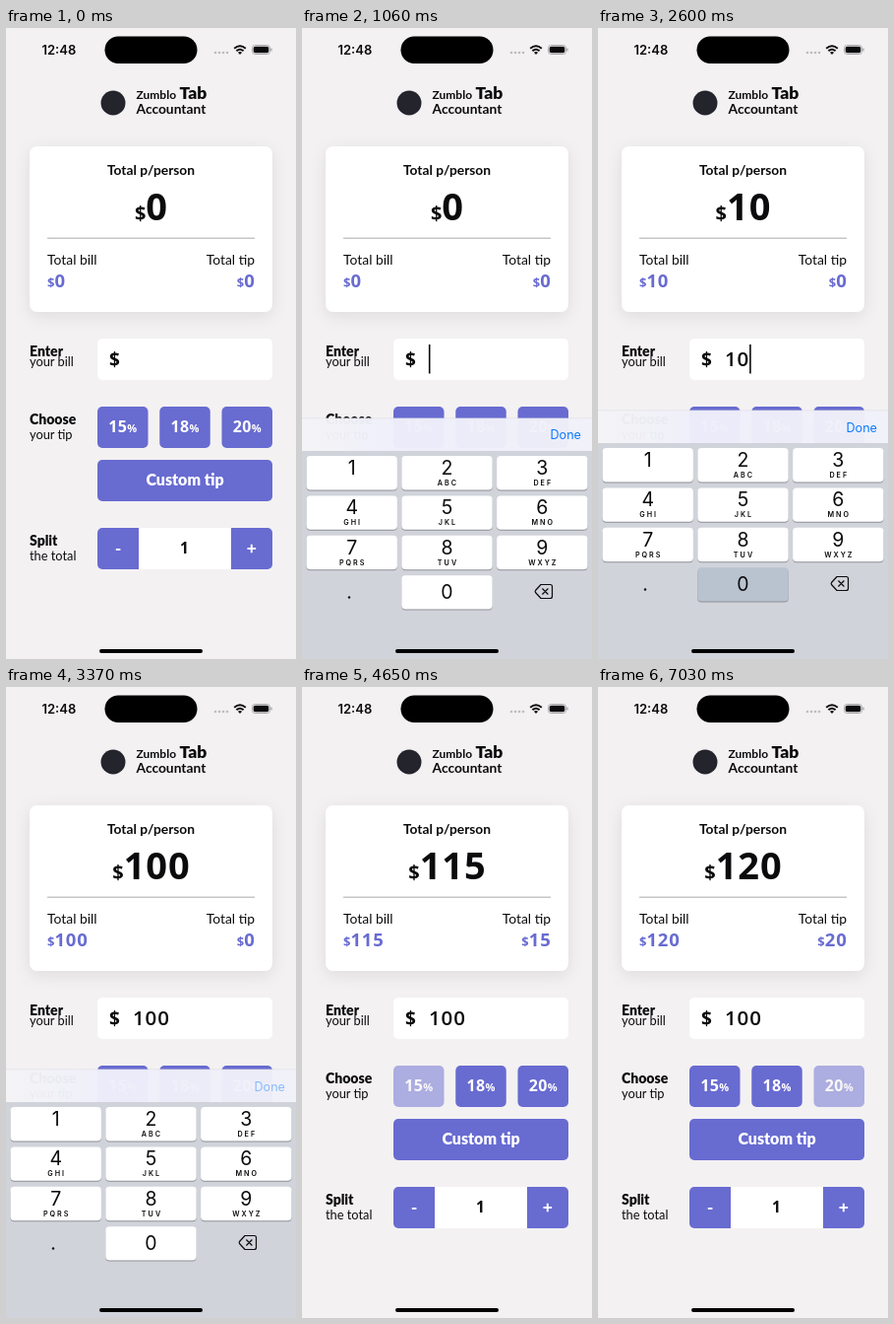
These frames come from a looping animation (295x640 px, 8000 ms). An HTML page:

```html
<!DOCTYPE html>
<html lang="en">
<head>
<meta charset="utf-8">
<title>Tip splitter</title>
<style>
html, body { margin: 0; width: 100%; height: 100%; overflow: hidden; background: #f3f1f2; }
svg { display: block; width: 100vw; height: 100vh; }
text { font-family: Lato, sans-serif; white-space: pre; }
.num { font-family: "Open Sans", sans-serif; font-weight: 700; }
.sys { font-family: Inter, sans-serif; }
</style>
</head>
<body>
<svg id="stage" viewBox="0 0 295 640">
  <defs>
    <filter id="soft" x="-20%" y="-20%" width="140%" height="140%">
      <feDropShadow dx="0" dy="4" stdDeviation="8" flood-color="#000" flood-opacity=".09"/>
    </filter>
    <linearGradient id="glass">
      <stop offset="0" stop-color="#f4f4f6"/>
      <stop offset=".35" stop-color="#efeffb"/>
      <stop offset="1" stop-color="#f1f1f9"/>
    </linearGradient>
  </defs>
  <rect width="295" height="640" fill="#f3f1f2"/>
  <g id="app"></g>
  <g id="keyboard"></g>
  <g id="system"></g>
</svg>
<script>
const LOOP = 8000, PURPLE = '#686bd0', INK = '#0b0b0d';
const byId = id => document.getElementById(id);

function add(parent, tag, attrs, content) {
  const el = document.createElementNS('http://www.w3.org/2000/svg', tag);
  for (const k in attrs) el.setAttribute(k, attrs[k]);
  if (content !== undefined) el.textContent = content;
  parent.appendChild(el);
  return el;
}
const rect = (p, x, y, width, height, rx, fill, more) =>
  add(p, 'rect', { x, y, width, height, rx, fill, ...more });
const path = (p, d, more) => add(p, 'path', { d, fill: 'none', ...more });
const label = (p, x, y, size, weight, str, more) =>
  add(p, 'text', { x, y, 'font-size': size, 'font-weight': weight, fill: INK, ...more }, str);

const middle = { 'text-anchor': 'middle' };
const sys = { class: 'sys' };

// Currency amount: small dollar sign followed by larger digits
function money(p, x, y, small, large, gap, fill, anchor) {
  const t = add(p, 'text', { x, y, class: 'num', fill, 'text-anchor': anchor });
  add(t, 'tspan', { 'font-size': small }, '$');
  return add(t, 'tspan', { 'font-size': large, 'letter-spacing': gap });
}

function buildApp(g) {
  add(g, 'circle', { cx: 109, cy: 76, r: 12.5, fill: '#24242d' });
  label(g, 132.5, 71.5, 12, 700, 'Zumblo');
  label(g, 176.5, 71.5, 17.5, 900, 'Tab');
  label(g, 132.5, 87, 13.8, 700, 'Accountant');

  rect(g, 24, 120, 247, 168, 8, '#fff', { filter: 'url(#soft)' });
  label(g, 147.5, 149, 13.8, 700, 'Total p/person', middle);
  const total = money(g, 148, 195, 20, 38, 1, INK, 'middle');
  rect(g, 42, 212.5, 211, 1.5, 0, '#c6c6c6');
  label(g, 42, 240, 13.9, 400, 'Total bill');
  label(g, 253, 240, 13.9, 400, 'Total tip', { 'text-anchor': 'end' });
  const bill = money(g, 42, 263, 13, 18.5, .8, PURPLE, 'start');
  const tip = money(g, 253.5, 263, 13, 18.5, .8, PURPLE, 'end');

  [['Enter', 333, 'your bill', 343], ['Choose', 402, 'your tip', 416.5], ['Split', 525, 'the total', 540]]
    .forEach(([head, y1, sub, y2]) => {
      label(g, 24, y1, 14, 900, head);
      label(g, 24, y2, 12.8, 400, sub);
    });

  rect(g, 93, 315, 178, 42, 5, '#fff');
  label(g, 105, 342.5, 19, 700, '$', { class: 'num' });
  const input = label(g, 129, 342.5, 20.5, 600, '', {
    style: 'font-weight:600', class: 'num', 'letter-spacing': .9
  });
  const caret = rect(g, 129, 321, 1.6, 29.5, 0, INK);

  const chips = [15, 18, 20].map((pct, i) => {
    const chip = add(g, 'g', {});
    const x = 93 + i * 63.25;
    rect(chip, x, 384, 51.5, 42, 5, PURPLE);
    const t = add(chip, 'text', { x: x + 25.75, y: 410, class: 'num', fill: '#fff', ...middle });
    add(t, 'tspan', { 'font-size': 16, 'letter-spacing': .4 }, pct);
    add(t, 'tspan', { 'font-size': 11 }, '%');
    return { chip, pct };
  });

  rect(g, 93, 438, 178, 42, 5, PURPLE);
  label(g, 182, 464, 16, 900, 'Custom tip', { ...middle, fill: '#fff' });

  rect(g, 93, 507, 178, 42, 5, PURPLE);
  rect(g, 135, 507, 94, 42, 0, '#fff');
  rect(g, 111.8, 528, 4.6, 1.9, 0, '#fff');
  path(g, 'M245.5 528H254.1M249.8 523.7V532.3', { stroke: '#fff', 'stroke-width': 2 });
  label(g, 181.5, 533, 15.5, 700, '1', { class: 'num', ...middle });
  return { total, bill, tip, input, caret, chips };
}

function buildKeyboard(g) {
  rect(g, 0, 388, 295, 34, 0, 'url(#glass)', { opacity: .97 });
  rect(g, 0, 387.6, 295, .6, 0, '#dcdce2');
  rect(g, 0, 421, 295, 260, 0, '#d0d3da');
  const done = label(g, 252.5, 409.5, 12.6, 400, 'Done', { ...sys, fill: '#0a7aff' });
  const keys = {};
  const key = (digit, letters, col, row) => {
    const x = 4.5 + col * 96.8, y = 426 + row * 40.4, cx = x + 46.2;
    rect(g, x, y + 1, 92.4, 34.4, 4, '#8d9096');
    keys[digit] = rect(g, x, y, 92.4, 34.4, 4, '#fff');
    label(g, cx, y + (row < 3 ? 19 : 24), 19.5, 400, digit, { ...sys, ...middle });
    if (letters) label(g, cx + 1, y + 30, 7.2, 600, letters, { ...sys, ...middle, 'letter-spacing': 2 });
  };
  ['', 'ABC', 'DEF', 'GHI', 'JKL', 'MNO', 'PQRS', 'TUV', 'WXYZ']
    .forEach((s, i) => key(i + 1, s, i % 3, Math.floor(i / 3)));
  key(0, '', 1, 3);
  add(g, 'circle', { cx: 48, cy: 569.5, r: 1.2, fill: INK });
  path(g, 'M243 556.5H252.5Q254.5 556.5 254.5 558.5V568.5Q254.5 570.5 252.5 570.5H243L237.5 564.5Q236.8 563.5 237.5 562.5ZM244.4 560.5L250.4 566.5M250.4 560.5L244.4 566.5',
    { stroke: INK, 'stroke-width': 1.2, 'stroke-linejoin': 'round' });
  return { g, done, keys };
}

function buildSystem(g) {
  label(g, 36.5, 26.8, 13, 600, '12:48', sys);
  rect(g, 100.5, 8.5, 94, 27.5, 13.75, '#000');
  for (let i = 0; i < 4; i++) add(g, 'circle', { cx: 213 + i * 4, cy: 25, r: 1.3, fill: '#bdbcbe' });
  path(g, 'M232.2 20.8Q238 15.6 243.8 20.8M234.4 23.3Q238 20.2 241.6 23.3', { stroke: INK, 'stroke-width': 1.9 });
  path(g, 'M235.9 24.8Q238 23.2 240.1 24.8L238 27Z', { style: 'fill:' + INK });
  rect(g, 250.5, 17.5, 18, 9, 2.8, 'none', { stroke: '#a3a2a5', 'stroke-width': .9 });
  rect(g, 251.7, 18.7, 15.6, 6.6, 1.8, INK);
  path(g, 'M270 20.5V23.5', { stroke: '#a3a2a5', 'stroke-width': 1.2 });
  rect(g, 95, 630, 105, 4, 2, '#000');
}

const app = buildApp(byId('app'));
const kb = buildKeyboard(byId('keyboard'));
buildSystem(byId('system'));

const within = (t, a, b) => t >= a && t < b;
// Critically damped spring, 1 down to 0
const spring = ms => {
  const x = .0147 * Math.max(0, ms);
  return (1 + x) * Math.exp(-x);
};
const hold = (t, start, step) => start + Math.floor((t - start) / step) * step;

function keyboardDrop(t) {
  if (t < 730 || t >= 4020) return 260;
  if (t < 1400) return 252 * spring(hold(t, 730, 110) - 700);
  if (t < 3120) return 0;
  return 252 * (1 - spring(hold(t, 3120, 113) - 3443));
}

function draw(t) {
  const typed = t < 1940 ? '' : t < 2460 ? '1' : t < 2840 ? '10' : '100';
  const pct = t < 4650 ? 0 : t < 6020 ? 15 : t < 7030 ? 18 : 20;
  const amount = Number(typed), tip = amount * pct / 100;

  app.total.textContent = app.bill.textContent = amount + tip;
  app.tip.textContent = tip;
  app.input.textContent = typed;
  app.caret.setAttribute('x', 128.9 + typed.length * 12.6);
  app.caret.setAttribute('opacity', within(t, 730, 1600) || within(t, 1940, 3340) ? 1 : 0);
  app.chips.forEach(c => c.chip.setAttribute('opacity', c.pct === pct ? .5 : 1));

  const pressed = within(t, 1710, 1940) ? '1'
    : within(t, 2330, 2460) || within(t, 2600, 2840) ? '0' : '';
  for (const k in kb.keys) kb.keys[k].setAttribute('fill', k === pressed ? '#b9c3cf' : '#fff');
  kb.done.setAttribute('opacity', t >= 3120 ? .45 : 1);
  kb.g.setAttribute('transform', `translate(0 ${keyboardDrop(t).toFixed(2)})`);
}

const begin = performance.now();
function tick() {
  draw((performance.now() - begin) % LOOP);
  requestAnimationFrame(tick);
}
tick();
</script>
</body>
</html>
```
